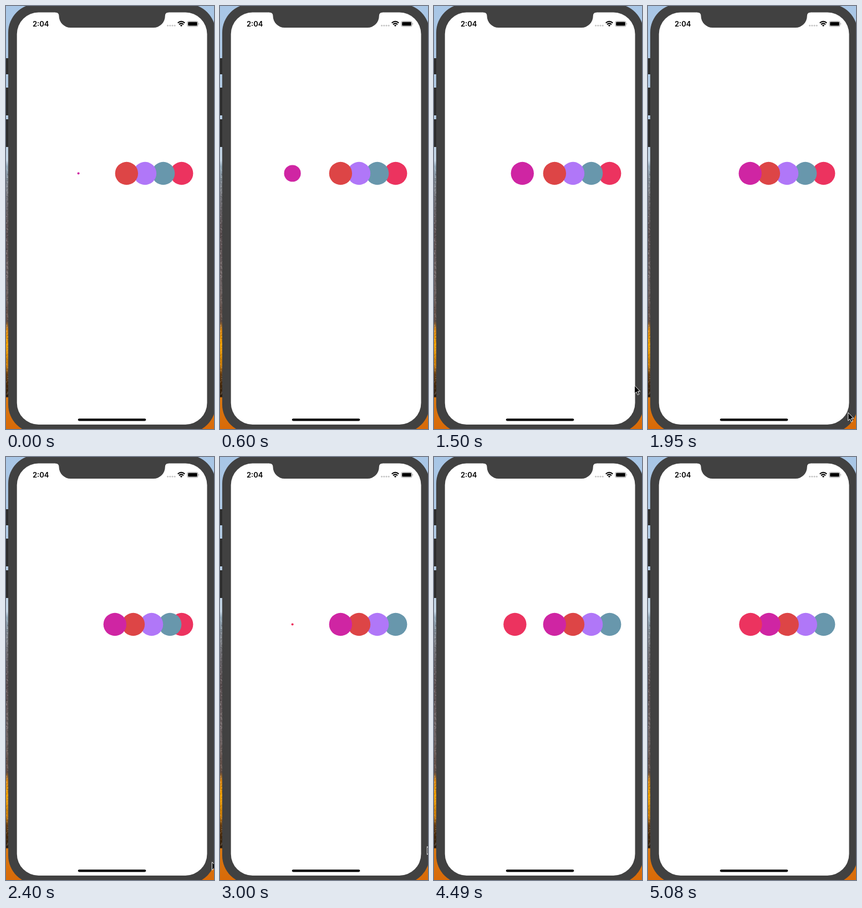
An HTML page that plays this animation: 375x762 px, repeating every 5180 ms.

```html
<!DOCTYPE html>
<html lang="en">
<head>
<meta charset="utf-8">
<title>Circle queue</title>
<style>
  html, body { margin: 0; width: 100%; height: 100%; overflow: hidden; }
  svg { display: block; width: 375px; height: 762px; }
  text { font: 600 13px Inter, Roboto, sans-serif; }
</style>
</head>
<body>
<svg viewBox="0 0 375 762">
  <defs>
    <linearGradient id="wall" gradientUnits="userSpaceOnUse" x1="0" y1="0" x2="0" y2="762">
      <stop offset="0" stop-color="#a8c6e6"/>
      <stop offset=".25" stop-color="#b3cbe3"/>
      <stop offset=".365" stop-color="#c2d3e2"/>
      <stop offset=".38" stop-color="#8fa4b4"/>
      <stop offset=".43" stop-color="#7d8188"/>
      <stop offset=".53" stop-color="#564b4d"/>
      <stop offset=".66" stop-color="#706667"/>
      <stop offset=".745" stop-color="#604b42"/>
      <stop offset=".765" stop-color="#d08010"/>
      <stop offset=".8" stop-color="#efa004"/>
      <stop offset=".85" stop-color="#c67a0a"/>
      <stop offset=".87" stop-color="#60380f"/>
      <stop offset=".924" stop-color="#2c1c0c"/>
      <stop offset=".926" stop-color="#d87812"/>
      <stop offset="1" stop-color="#d96a08"/>
    </linearGradient>
  </defs>
  <rect width="375" height="762" fill="url(#wall)"/>
  <g id="grain"></g>

  <g fill="#2d2d2d">
    <rect y="94" width="6" height="29"/>
    <rect y="147" width="6" height="50"/>
    <rect y="204" width="6" height="50"/>
  </g>
  <rect x="4" y="-4" width="374" height="773.5" rx="52" fill="#414141"/>
  <rect x="19.7" y="11.6" width="342.8" height="742.4" rx="39" fill="#fff"/>
  <path d="M89 11H293V11.6Q286.8 12 286.8 18A21 21 0 0 1 265.8 39H116.5A21 21 0 0 1 95.5 18Q95.5 12 89 11.6Z" fill="#414141"/>

  <text x="48" y="36.7">2:04</text>
  <g fill="#c4c4c4">
    <circle cx="291.6" cy="35.3" r="1.5"/><circle cx="295.8" cy="35.3" r="1.5"/>
    <circle cx="300" cy="35.3" r="1.5"/><circle cx="304.2" cy="35.3" r="1.5"/>
  </g>
  <g fill="none" stroke="#000" stroke-width="2">
    <path d="M309.7 30.6Q316 25 322.3 30.6"/>
    <path d="M312 33.2Q316 29.6 320 33.2"/>
  </g>
  <path d="M313.8 34.9Q316 33.2 318.2 34.9L316 37.1Z"/>
  <rect x="326.9" y="27.5" width="19.2" height="9.4" rx="2.4" fill="none" stroke="#999" stroke-width=".9"/>
  <rect x="328.2" y="28.8" width="16.6" height="6.8" rx="1.3"/>
  <path d="M347.2 30.6Q349.2 32.2 347.2 33.8Z" fill="#999"/>
  <rect x="129.8" y="743.2" width="122.5" height="4.2" rx="2.1"/>

  <g id="circles"></g>
  <path id="cursor" d="M.5 .7V15.2L3.8 12.1L6.2 17.5L8.7 16.4L6.3 11.1H10.7Z" stroke="#fff"/>
</svg>
<script>
const LOOP = 5180, STEP = 150, LAST = 5080, CYCLE = 3000, LEAD = 20;
const START_X = 130.6, SLOT_X = 217.4, GAP = 33.1, Y = 301.5, RADIUS = 20.7;
const COLORS = ['#cf25a3', '#dd4546', '#b077f8', '#6897ac', '#ec335f'];
const CURSOR_PATH = [
  [1050, 361, 716], [1500, 361, 683], [2100, 360, 748],
  [2400, 371, 729], [3000, 373, 701], [3300, 374, 740]
];
const CURSOR_END = 3450;

const cursor = document.getElementById('cursor');
const add = (parent, tag, attrs) => {
  const node = document.createElementNS('http://www.w3.org/2000/svg', tag);
  for (const key in attrs) node.setAttribute(key, attrs[key]);
  return document.getElementById(parent).appendChild(node);
};
const mix = (a, b, p) => a + (b - a) * p;

// Rough rock and foliage beside the phone
let seed = 7;
const random = () => (seed = seed * 16807 % 2147483647) / 2147483647;
for (let y = 290; y < 704; y += 2) {
  add('grain', 'rect', {
    x: Math.floor(random() * 4), y, width: 2, height: 2,
    fill: random() < .5 ? '#000' : '#fff', opacity: random() * .2
  });
}

// Painted from the rightmost slot to the incoming circle on top
const circles = COLORS.map(() => add('circles', 'circle', { cy: Y })).reverse();

// cubic-bezier(.42, 0, .58, 1)
function easeInOut(x) {
  if (x <= 0 || x >= 1) return Math.min(1, Math.max(0, x));
  let low = 0, high = 1;
  for (let i = 0; i < 24; i++) {
    const u = (low + high) / 2, v = 1 - u;
    if (1.26 * v * v * u + 1.74 * v * u * u + u ** 3 < x) low = u;
    else high = u;
  }
  return low * low * (3 - 2 * low);
}

function drawCircles(time) {
  const round = Math.floor(time / CYCLE);
  const t = time % CYCLE + LEAD;
  const phase = n => easeInOut(t / 1000 - n);
  const shift = phase(2) * GAP;
  circles.forEach((circle, i) => {
    const slot = SLOT_X + (i - 1) * GAP;
    const x = i === 0 ? mix(START_X, slot, phase(1)) + shift
      : i === 4 ? slot : slot + shift;
    circle.setAttribute('cx', x);
    circle.setAttribute('r', i === 0 ? RADIUS * mix(.1, 1, phase(0)) : RADIUS);
    circle.setAttribute('fill', COLORS[(i - round + 5) % 5]);
  });
}

function drawCursor(time) {
  const visible = time >= CURSOR_PATH[0][0] && time < CURSOR_END;
  cursor.setAttribute('visibility', visible ? 'visible' : 'hidden');
  if (!visible) return;
  const next = CURSOR_PATH.findIndex(point => point[0] > time);
  const end = next < 0 ? CURSOR_PATH.length - 1 : next;
  const [t0, x0, y0] = CURSOR_PATH[end - 1], [t1, x1, y1] = CURSOR_PATH[end];
  const p = Math.min(1, (time - t0) / (t1 - t0));
  cursor.setAttribute('transform', `translate(${mix(x0, x1, p)} ${mix(y0, y1, p)})`);
}

function render(elapsed) {
  const t = elapsed % LOOP;
  const time = t >= LAST ? LAST : Math.floor(t / STEP) * STEP;
  drawCircles(time);
  drawCursor(time);
}

const origin = performance.now();
function tick() {
  render(performance.now() - origin);
  requestAnimationFrame(tick);
}
tick();
</script>
</body>
</html>
```
